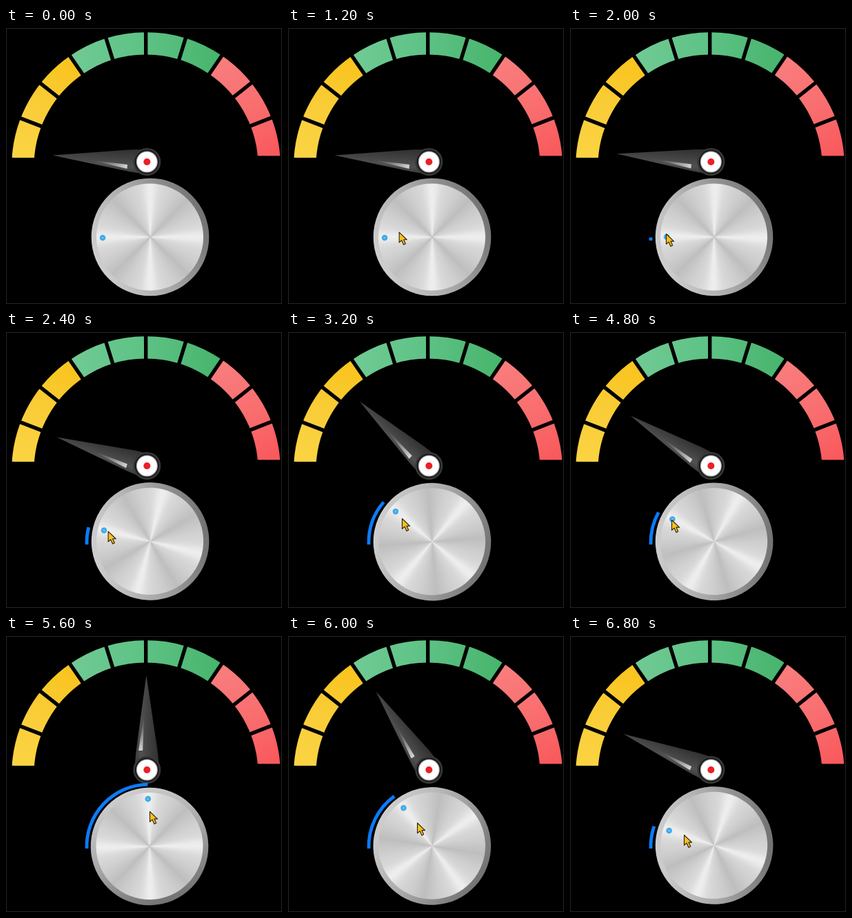
Write an HTML page with a canvas that moves like this. It is 400 by 400 pixels and loops after 7.2 s.

```html
<!DOCTYPE html>
<html lang="en">
<head>
<meta charset="utf-8">
<title>Knob and gauge</title>
<style>
  html, body { margin: 0; width: 100%; height: 100%; overflow: hidden; background: #000; }
  canvas { display: block; width: 400px; height: 400px; }
</style>
</head>
<body>
<canvas id="stage"></canvas>
<script>
const canvas = document.getElementById('stage');
const ctx = canvas.getContext('2d');
const ratio = window.devicePixelRatio || 1;
canvas.width = canvas.height = 400 * ratio;

const STEP = 400, STEPS = 18;
const RAD = Math.PI / 180;

// Turning points of the drag; the steps between them are interpolated.
const keys = [
  { at: 1, value: 0, x: 190, y: 283 },
  { at: 4, value: 0, x: 146, y: 302 },
  { at: 5, value: 1, x: 139, y: 298 },
  { at: 8, value: 40.5, x: 165, y: 270 },
  { at: 10, value: 58.5, x: 185, y: 256 },
  { at: 12, value: 29, x: 147, y: 272 },
  { at: 14, value: 89, x: 208, y: 254 },
  { at: 16, value: 19, x: 166, y: 287 },
  { at: 17, value: 19, x: 165, y: 288 }
];

function pose(step) {
  const next = keys.findIndex(k => k.at >= step);
  const b = keys[next], a = keys[next - 1] || b;
  const part = a === b ? 0 : (step - a.at) / (b.at - a.at);
  const mix = name => a[name] + (b[name] - a[name]) * part;
  return { value: mix('value'), x: mix('x'), y: mix('y') };
}

function linear(x0, y0, x1, y1, ...colors) {
  const g = ctx.createLinearGradient(x0, y0, x1, y1);
  colors.forEach((c, i) => g.addColorStop(i / (colors.length - 1), c));
  return g;
}

function disc(x, y, r, fill) {
  ctx.beginPath();
  ctx.arc(x, y, r, 0, 2 * Math.PI);
  ctx.fillStyle = fill;
  ctx.fill();
}

function poly(points, fill) {
  ctx.beginPath();
  points.forEach(([x, y]) => ctx.lineTo(x, y));
  ctx.closePath();
  ctx.fillStyle = fill;
  ctx.fill();
}

function placed(x, y, angle, draw) {
  ctx.save();
  ctx.translate(x, y);
  ctx.rotate(angle * RAD);
  draw();
  ctx.restore();
}

function arc(x, y, r, from, to, width, paint) {
  ctx.beginPath();
  ctx.arc(x, y, r, from * RAD, to * RAD);
  ctx.lineWidth = width;
  ctx.strokeStyle = paint;
  ctx.stroke();
}

// Ten equal segments: three yellow, four green, three red.
function drawScale() {
  const cx = 203, cy = 201;
  const limit = k => 183.9 + 17.2 * k;
  const band = (from, to, paint) => arc(cx, cy, 178.7, limit(from), limit(to), 32.3, paint);
  band(0, 3, linear(20, 188, 90, 50, '#fbd443', '#f9cd38', '#f9c41f'));
  band(3, 7, linear(100, 40, 305, 40, '#6fca93', '#5dc285', '#48b56d'));
  band(7, 10, linear(310, 45, 385, 185, '#f97d7e', '#f96f70', '#f9595c'));
  ctx.fillStyle = '#000';
  for (let k = 1; k < 10; k++) {
    placed(cx, cy, limit(k), () => ctx.fillRect(158, -2.7, 42, 5.4));
  }
  ctx.fillRect(4, 188, 60, 16);
  ctx.fillRect(345, 185.3, 54, 18);
}

function drawNeedle(value) {
  placed(204.3, 194, 4 + value * 0.962, () => {
    poly([[-137, 0], [-24, -16], [0, -18], [0, 18], [-24, 16]],
      linear(0, -17, 0, 17, '#303030', '#3a3a3a', '#454545', '#505050', '#3c3c3c'));
    poly([[-85, 3], [-28, 6], [-28, 12]],
      linear(-85, 0, -28, 0, '#50505000', '#787878', '#d4d4d4'));
  });
  disc(204.3, 194, 20, '#383838');
  disc(204.3, 194, 17.5, '#181818');
  disc(204.3, 194, 15.5, '#b5b5b5');
  disc(204.3, 194, 14.3, '#fff');
  disc(204.3, 194, 5, '#ea1f28');
}

// Brushed metal: four bright rays at right angles.
function brushed(x, y) {
  const g = ctx.createConicGradient(0, x, y);
  const stops = 96;
  for (let i = 0; i <= stops; i++) {
    const wave = Math.abs(Math.cos(4 * Math.PI * i / stops));
    const tone = Math.round(190 + 28 * wave + 20 * wave ** 24);
    g.addColorStop(i / stops, `rgb(${tone},${tone},${tone})`);
  }
  return g;
}

function drawKnob(value) {
  placed(207.5, 303.5, value, () => {
    disc(1.5, -0.5, 85.3, linear(-75, 35, 78, -30, '#cecece', '#a8a8a8', '#747474'));
    disc(1, -0.5, 77.5, brushed(1.5, -0.5));
    disc(-67.4, 0.5, 4.3, '#3eaaea');
    disc(-67.4, 0.5, 1.6, '#6fc0ee');
  });
}

function drawPointer(x, y) {
  placed(x + 0.5, y + 0.5, 0, () => {
    ctx.scale(0.92, 0.92);
    poly([[0, 0], [0, 16], [3.8, 12.6], [7, 19.5], [10, 18], [7, 11.5], [12, 11.5]], '#f9c01f');
    ctx.lineWidth = 1.2;
    ctx.lineJoin = 'round';
    ctx.strokeStyle = '#2a210c';
    ctx.stroke();
  });
}

function draw(now) {
  const step = Math.floor(now / STEP) % STEPS;
  const { value, x, y } = pose(step);
  ctx.setTransform(ratio, 0, 0, ratio, 0, 0);
  ctx.fillStyle = '#000';
  ctx.fillRect(0, 0, 400, 400);
  ctx.lineWidth = 1;
  ctx.strokeStyle = '#262626';
  ctx.strokeRect(0.5, 0.5, 399, 399);
  drawScale();
  drawNeedle(value);
  drawKnob(value);
  if (value > 0) arc(207, 305, 90, 178.1, 180 + value, 4.8, '#0a7cfa');
  if (step > 0) drawPointer(x, y);
}

const start = performance.now();
function tick() {
  draw(performance.now() - start);
  requestAnimationFrame(tick);
}
tick();
</script>
</body>
</html>
```
